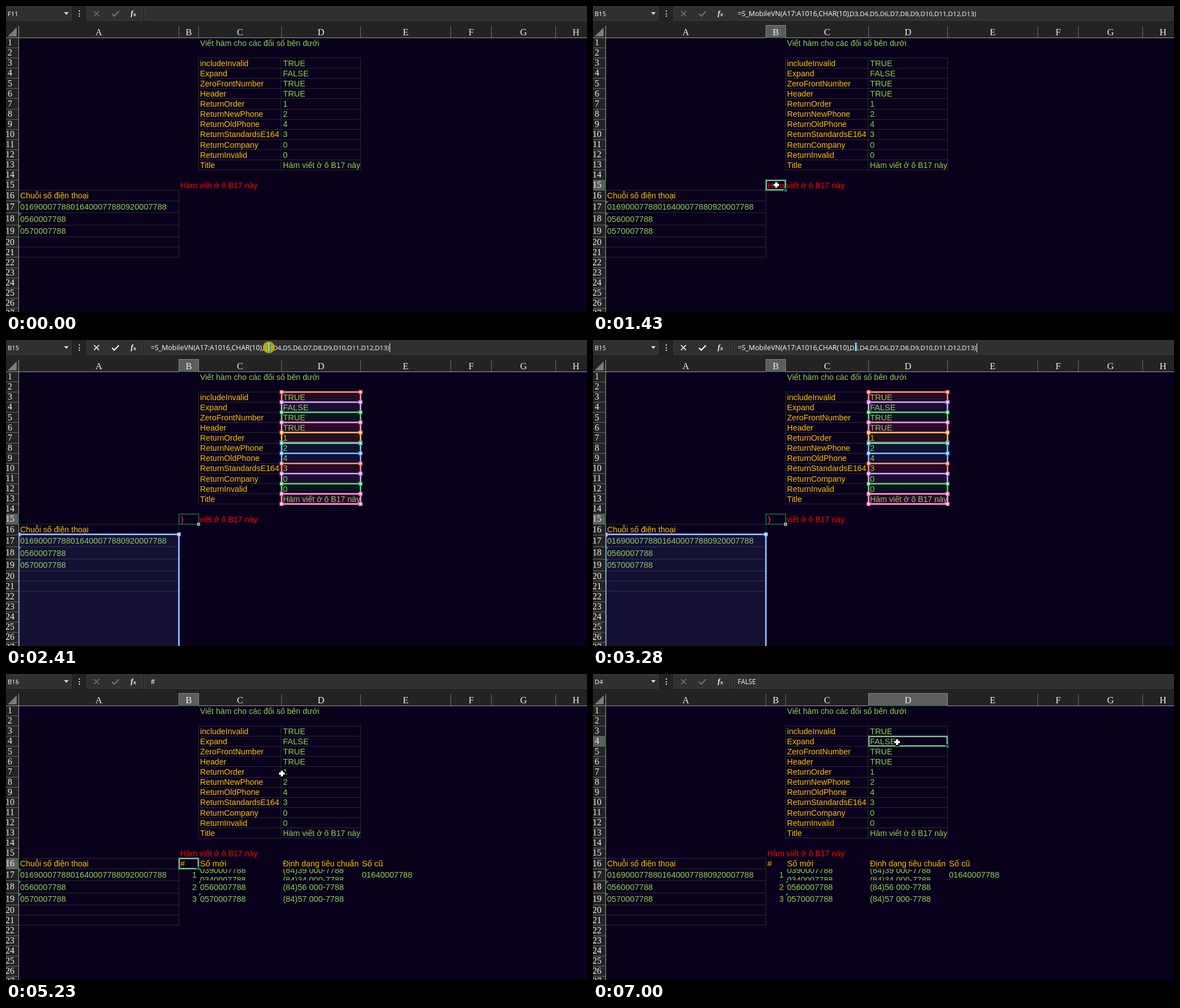
An HTML page with a canvas that plays this animation: 1030x544 px, repeating every 8000 ms.

```html
<!DOCTYPE html>
<html lang="vi">
<head>
<meta charset="utf-8">
<title>Spreadsheet function demo</title>
<style>
html, body { margin: 0; width: 100%; height: 100%; overflow: hidden; background: #09001c; }
canvas { display: block; }
</style>
</head>
<body>
<canvas id="stage" width="1030" height="544"></canvas>
<script>
const ctx = document.getElementById('stage').getContext('2d');
const LOOP = 8000;
const SANS = '"Liberation Sans", Arial, sans-serif';
const SERIF = '"Liberation Serif", "Times New Roman", serif';
const UI = '"Open Sans", "Noto Sans", sans-serif';
const BG = '#09001c', YELLOW = '#ffc000', GREEN = '#92d050', RED = '#ff0000', SEL = '#217346';

// Column edges A..H and row edges 1..27
const colX = [22, 306, 341, 488, 628, 788, 860, 974, 1046];
const rowY = [56];
for (let r = 1; r <= 27; r++) {
  const tall = r >= 17 && r <= 19;
  rowY.push(rowY[r - 1] + (tall ? 21.5 : r === 16 ? 18.6 : 18.08));
}

const options = [
  ['includeInvalid', 'TRUE'], ['Expand', 'FALSE'], ['ZeroFrontNumber', 'TRUE'],
  ['Header', 'TRUE'], ['ReturnOrder', '1'], ['ReturnNewPhone', '2'],
  ['ReturnOldPhone', '4'], ['ReturnStandardsE164', '3'], ['ReturnCompany', '0'],
  ['ReturnInvalid', '0'], ['Title', 'Hàm viết ở ô B17 này']
];
const oldPhone = '01640007788';
const split = ['0390007788', '0340007788'];
const phones = ['0560007788', '0570007788'];
const input = ['01690007788' + oldPhone + '0920007788', ...phones];
const standard = n => `(84)${n.slice(1, 3)} ${n.slice(3, 6)}-${n.slice(6)}`;
const rangeColors = ['#ff5555', '#b277e8', '#22b043', '#ff62b8', '#ff8c22', '#24aebf', '#4a8ff0'];

// Screen updates come in bursts: [start, end, steps]
const bursts = [
  [100, 860, 8], [980, 1430, 5], [1850, 2620, 8], [2720, 2720, 1], [2950, 3280, 4],
  [3500, 4260, 8], [4690, 5470, 8], [5690, 6010, 4], [6240, 6680, 5], [6900, 7000, 2]
];
const path = [
  [100, 721, 507], [860, 351, 329], [1092, 325, 318], [1740, 325, 318], [2290, 466, 13],
  [2840, 466, 13], [3280, 466, 12], [4580, 466, 12], [5247, 489, 177], [5358, 531, 165],
  [5470, 528, 152], [5580, 528, 152], [6010, 542, 107], [6130, 542, 107], [6680, 539, 121]
];

const clamp = v => Math.max(0, Math.min(1, v));
const mix = (a, b, p) => a + (b - a) * p;

function snap(t) {
  let s = 0;
  for (const [a, b, n] of bursts) {
    if (t < a) break;
    const d = n > 1 ? (b - a) / (n - 1) : 1;
    s = a + d * Math.min(n - 1, Math.floor((t - a + 18) / d));
  }
  return s;
}

function cursorAt(t) {
  let i = 0;
  while (i < path.length - 2 && t > path[i + 1][0]) i++;
  const [a, ax, ay] = path[i], [b, bx, by] = path[i + 1];
  const p = clamp((t - a) / (b - a));
  return [mix(ax, bx, p), mix(ay, by, p)];
}

function rect(x, y, w, h, color) {
  ctx.fillStyle = color;
  ctx.fillRect(x, y, w, h);
}

function frame(x, y, w, h, color, width = 1) {
  ctx.strokeStyle = color;
  ctx.lineWidth = width;
  ctx.strokeRect(x, y, w, h);
}

function line(points, color, width) {
  ctx.strokeStyle = color;
  ctx.lineWidth = width;
  ctx.beginPath();
  points.forEach(([x, y]) => ctx.lineTo(x, y));
  ctx.stroke();
}

function shape(points, color) {
  ctx.fillStyle = color;
  ctx.beginPath();
  points.forEach(([x, y]) => ctx.lineTo(x, y));
  ctx.fill();
}

// Baselines sit on whole pixels to keep the glyphs crisp
function text(s, x, y, font, color, align = 'left') {
  ctx.font = font;
  ctx.fillStyle = color;
  ctx.textAlign = align;
  ctx.fillText(s, x, Math.round(y));
}

const midY = row => (rowY[row - 1] + rowY[row]) / 2;
const sheetFont = s => (/[a-z]{2}/.test(s) ? 14.2 : 14.6) + 'px ' + SANS;

function cell(s, col, row, color) {
  text(s, colX[col] + 3, midY(row) + 5.7, sheetFont(s), color);
}

function cellBox(col, row) {
  return [colX[col], rowY[row - 1], colX[col + 1] - colX[col], rowY[row] - rowY[row - 1]];
}

function errorMark(col, row) {
  const x = colX[col] + 1, y = Math.round(rowY[row - 1]) + 1;
  shape([[x, y], [x + 5, y], [x, y + 5]], '#118a25');
}

function drawBar(name, formula, editing) {
  rect(0, 0, 1030, 56, '#232323');
  for (const [x, w] of [[-2, 118], [143, 100], [245, 790]]) {
    rect(x, 1, w, 24, '#303030');
    frame(x + .5, 1.5, w - 1, 24, '#414141');
  }
  text(name, 3, 18, '11.2px ' + UI, '#fff');
  shape([[103, 11], [111, 11], [107, 15.5]], '#e8e8e8');
  for (const y of [8, 13, 17]) rect(129, y, 2, 2, '#e8e8e8');
  const ink = editing ? '#fff' : '#747474';
  line([[156, 9], [165, 18]], ink, 1.7);
  line([[165, 9], [156, 18]], ink, 1.7);
  line([[188, 14], [192, 18], [200, 9.5]], ink, 2);
  text('f', 221, 17, 'italic bold 13px ' + SERIF, '#fff');
  text('x', 225.5, 18, 'italic bold 10.5px ' + SERIF, '#fff');
  if (formula.length < 10) {
    text(formula, 256.5, 18, '11.7px ' + UI, '#fff');
  } else {
    const cut = formula.indexOf('D3');
    text(formula.slice(0, cut), 256.5, 18, '12.4px ' + UI, '#fff');
    text(formula.slice(cut), 455, 18, '11.6px ' + UI, '#fff');
  }
  if (editing) rect(680, 6, 1, 16, '#fff');
}

function drawHeaders(col, row) {
  rect(0, 56, 22, 488, '#232323');
  shape([[19, 38], [19, 54], [3, 54]], '#7b7b7b');
  for (let c = 0; c < 8; c++) {
    const x = colX[c], w = colX[c + 1] - x;
    rect(x + w, 36, 1, 20, '#707070');
    if (c === col) {
      rect(x, 34, w, 22, '#5d5d5d');
      frame(x + .5, 34.5, w, 22, '#8a8a8a');
    }
    text('ABCDEFGH'[c], x + w / 2 + .5, 51.5, '16.5px ' + SERIF, '#f0f0f0', 'center');
  }
  for (let r = 1; r <= 27; r++) {
    const y = Math.round(rowY[r - 1]), h = Math.round(rowY[r]) - y;
    if (r === row) rect(0, y, 21, h, '#5d5d5d');
    rect(0, y + h, 22, 1, '#6a6a6a');
    text(r, 7, midY(r) + 5.2, '16px ' + SERIF, '#f0f0f0', 'center');
  }
  rect(0, 56, 1030, 1, '#a0a0a0');
  rect(22, 35, 1, 509, '#a0a0a0');
  if (col >= 0) {
    rect(colX[col], 56, colX[col + 1] - colX[col], 1, SEL);
    rect(21, rowY[row - 1], 2, rowY[row] - rowY[row - 1], SEL);
  }
}

function drawGrid() {
  const edge = '#2b2a2f';
  for (let r = 2; r <= 13; r++) rect(341, Math.round(rowY[r]), 288, 1, edge);
  for (const x of [341, 487, 628]) rect(x, 92, 1, 200, edge);
  for (let r = 15; r <= 21; r++) rect(22, Math.round(rowY[r]), 285, 1, edge);
  rect(306, 327, 1, 120, edge);
}

function drawSheet(results, marks) {
  cell('Viết hàm cho các đối số bên dưới', 2, 1, GREEN);
  options.forEach(([key, value], i) => {
    cell(key, 2, i + 3, YELLOW);
    cell(value, 3, i + 3, GREEN);
  });
  cell('Hàm viết ở ô B17 này', 1, 15, RED);
  cell('Chuỗi số điện thoại', 0, 16, YELLOW);
  input.forEach((s, i) => {
    cell(s, 0, 17 + i, GREEN);
    errorMark(0, 17 + i);
  });
  if (!results) return;
  ['#', 'Số mới', 'Định dạng tiêu chuẩn', 'Số cũ'].forEach((s, i) => cell(s, i + 1, 16, YELLOW));
  for (let i = 0; i < 3; i++) {
    text(i + 1, 338, midY(17 + i) + 5.7, '14.6px ' + SANS, GREEN, 'right');
  }
  cell(oldPhone, 4, 17, GREEN);
  ctx.save();
  ctx.beginPath();
  ctx.rect(341, 346.5, 287, 20.5);
  ctx.clip();
  split.forEach((n, i) => {
    text(n, 344, 354 + i * 17, '14.6px ' + SANS, GREEN);
    text(standard(n), 491, 354 + i * 17, '14.6px ' + SANS, GREEN);
  });
  ctx.restore();
  phones.forEach((n, i) => {
    cell(n, 2, 18 + i, GREEN);
    cell(standard(n), 3, 18 + i, GREEN);
    if (marks) errorMark(2, 18 + i);
  });
}

function refBox([x, y, w, h], color) {
  const base = ctx.globalAlpha;
  ctx.globalAlpha = base * .11;
  rect(x, y, w, h, color);
  ctx.globalAlpha = base;
  frame(x + .5, y + .5, w, h, color, 3);
  frame(x + .5, y + .5, w, h, 'rgba(244, 234, 244, .65)', 1);
}

function refHandles([x, y, w, h], color) {
  for (const [hx, hy] of [[x, y], [x + w, y], [x, y + h], [x + w, y + h]]) {
    rect(hx - 3, hy - 3, 7, 7, color);
    rect(hx - 1.5, hy - 1.5, 4, 4, '#f6e8f4');
  }
}

function drawRefs(alpha) {
  ctx.save();
  ctx.globalAlpha = alpha;
  const refs = options.map((o, i) => [cellBox(3, i + 3).map(Math.round), rangeColors[i % 7]]);
  refs.push([[22, 345, 284, 400], '#6d9cf5']);
  refs.forEach(r => refBox(...r));
  refs.forEach(r => refHandles(...r));
  ctx.restore();
}

function drawSelection([x, y, w, h], moving) {
  x = Math.round(x); y = Math.round(y); w = Math.round(w); h = Math.round(h);
  frame(x + .5, y + .5, w, h, SEL, 3);
  frame(x + 1.5, y + 1.5, w - 2, h - 2, moving ? '#c4d4cc' : '#fff', 1);
  rect(x + w - 3, y + h - 3, 6, 6, BG);
  rect(x + w - 2, y + h - 2, 5, 5, SEL);
}

function fly(from, to, p) {
  const a = cellBox(...from), b = cellBox(...to);
  drawSelection(a.map((v, i) => mix(v, b[i], p)), p < 1);
}

function drawCursor(x, y, click) {
  if (click) {
    ctx.fillStyle = 'rgba(200, 184, 0, .85)';
    ctx.beginPath();
    ctx.arc(x, y, 10.5, 0, 7);
    ctx.fill();
  }
  x = Math.round(x);
  y = Math.round(y);
  if (y < 26) {
    rect(x - 2, y - 7, 5, 15, 'rgba(20, 110, 130, .7)');
    rect(x - 2, y - 7, 4, 1, '#8ff4ff');
    rect(x - 2, y + 6, 4, 1, '#8ff4ff');
    rect(x - 1, y - 7, 2, 14, '#a8f8ff');
  } else {
    rect(x - 3, y - 6, 7, 13, '#000');
    rect(x - 6, y - 3, 13, 7, '#000');
    rect(x - 2, y - 5, 4, 10, '#fff');
    rect(x - 5, y - 2, 10, 4, '#fff');
  }
}

function draw(time) {
  const t = snap(time);
  const editing = t > 2395 && t < 3500;
  const waiting = t >= 3500 && t < 4030;
  const results = t > 3810;
  const second = t > 6890;
  let name = 'F11', formula = '', col = -1, row = -1;
  if (t > 1190) {
    [name, col, row] = ['B15', 1, 15];
    formula = '=S_MobileVN(A17:A1016,CHAR(10),D3,D4,D5,D6,D7,D8,D9,D10,D11,D12,D13)';
  }
  if (results) [name, formula, row] = ['B16', '#', 16];
  if (waiting) name = formula = '';
  if (second) [name, formula, col, row] = ['D4', 'FALSE', 3, 4];

  rect(0, 0, 1030, 544, BG);
  drawGrid();
  drawSheet(results, t > 4030);
  if (t > 2395 && t < 4030) drawRefs(1 - clamp((t - 3830) / 200));
  if (editing) {
    rect(307, 310, 34, 17, BG);
    text(')', 310, 323.5, '14.2px ' + SANS, '#ff4b3c');
    frame(306.5, 309.5, 35, 18, SEL, 1.5);
    rect(339, 325, 5, 5, '#e8f4ec');
    rect(340, 326, 3, 3, SEL);
  } else if (second) {
    fly([1, 16], [3, 4], clamp((t - 6840) / 155));
  } else if (results) {
    fly([1, 15], [1, 16], clamp((t - 3820) / 200));
  } else if (t > 1190) {
    fly([5, 11], [1, 15], clamp((t - 1170) / 255));
  }
  drawBar(name, formula, editing);
  drawHeaders(col, row);
  const click = (t > 1190 && t < 1300) || (t > 2395 && t < 2600) || (t > 6890 && t < 6990);
  if (t >= 100) drawCursor(...cursorAt(t), click);
}

const start = performance.now();
function tick(now) {
  draw(Math.max(0, now - start) % LOOP);
  requestAnimationFrame(tick);
}
draw(0);
requestAnimationFrame(tick);
</script>
</body>
</html>
```
